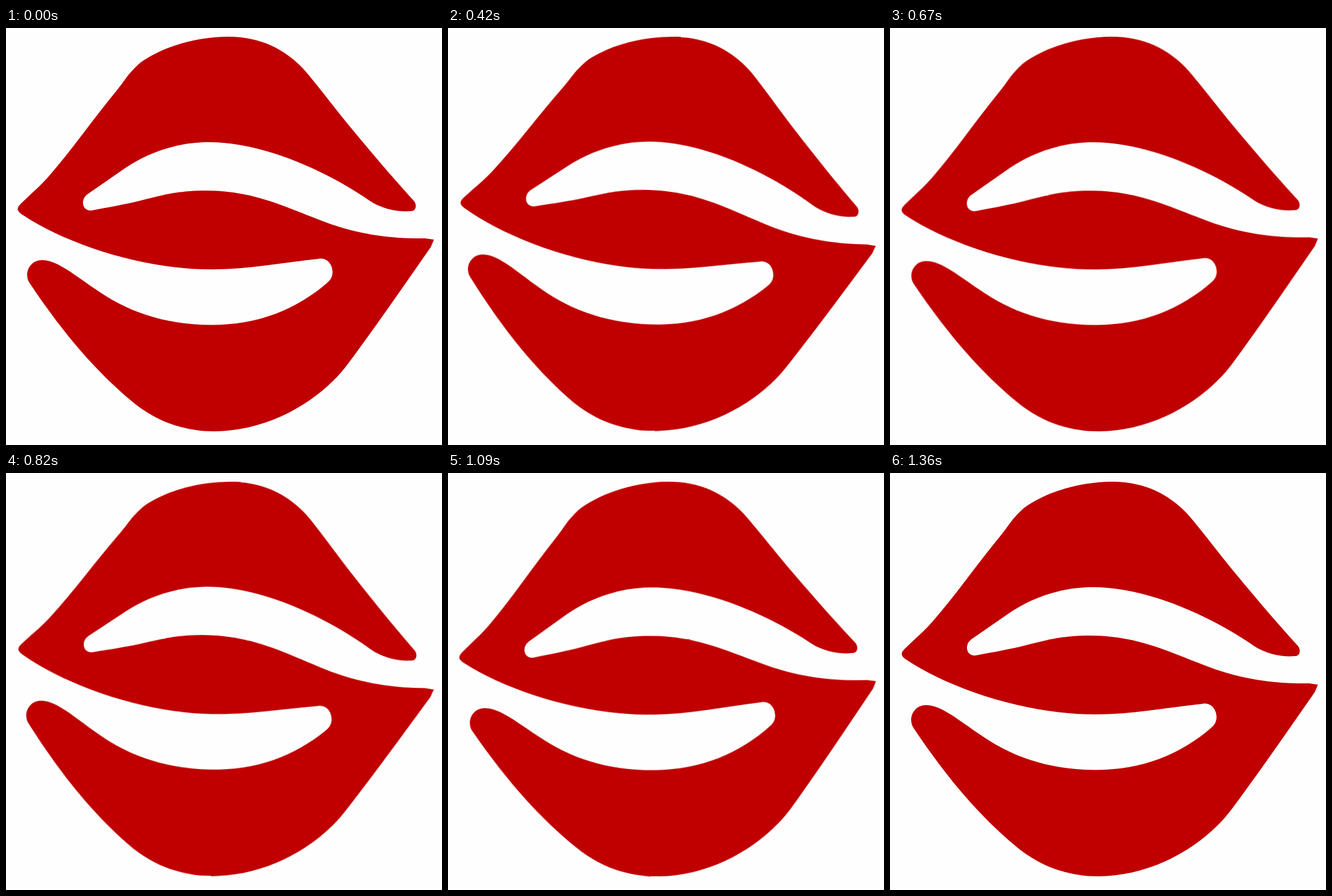
Recreate the animation shown at these times as an HTML page without scripts. Size 702 px wide and 672 px high, loop 1.64 s.

```html
<!DOCTYPE html>
<html lang="en">
<head>
<meta charset="utf-8">
<title>Teetering lips</title>
<style>
  html, body {
    margin: 0;
    width: 100%;
    height: 100%;
    overflow: hidden;
    background: #fefefe;
  }
  svg {
    display: block;
    width: 100%;
    height: 100%;
  }
  .lips {
    fill: #c00000;
    transform-origin: 354px 332px;
    animation: teeter 1640ms infinite;
  }
  /* Each swing advances in 30 ms ticks; the first peak is held for 100 ms. */
  @keyframes teeter {
    0%     { transform: rotate(0deg);     animation-timing-function: steps(1); }
    10.97% { transform: rotate(0deg);     animation-timing-function: steps(3); }
    16.46% { transform: rotate(1.9deg);   animation-timing-function: steps(1); }
    18.29% { transform: rotate(2deg);     animation-timing-function: steps(1); }
    24.39% { transform: rotate(1.75deg);  animation-timing-function: steps(6); }
    35.36% { transform: rotate(-1.85deg); animation-timing-function: steps(1); }
    37.19% { transform: rotate(-1.5deg);  animation-timing-function: steps(5); }
    46.34% { transform: rotate(1.5deg);   animation-timing-function: steps(1); }
    48.17% { transform: rotate(2deg);     animation-timing-function: steps(6); }
    59.14% { transform: rotate(-1.8deg);  animation-timing-function: steps(1); }
    60.97% { transform: rotate(-1.85deg); animation-timing-function: steps(6); }
    71.95% { transform: rotate(-.05deg);  animation-timing-function: steps(1); }
    73.78%, 100% { transform: rotate(0deg); }
  }
</style>
</head>
<body>
<svg viewBox="0 0 702 672">
  <path class="lips" d="
    M19 291 Q19 288 24 283
    C38 269 53 257 68 240 C105 198 140 147 178 101
    C190 87 194 76 215 57 C248 32 304 14 358 14
    C412 14 450 36 477 64 C498 87 528 128 558 164
    C590 203 627 246 657 279 C662 285 660 295 653 295
    C634 297 607 293 585 278 C520 233 417 184 327 184
    C268 184 223 205 193 225 L131 268
    C119 277 123 296 138 294 C170 288 193 284 217 278
    C250 270 275 262 322 262 C400 262 450 289 520 315
    C575 335 630 340 675 339 L689 341 L684 353
    C640 416 597 479 550 542 C505 602 422 650 335 650
    C290 650 243 636 202 601 C143 552 90 489 38 411
    C28 396 38 374 58 374 C90 374 127 415 182 444
    C226 467 277 478.5 331 478.5 C405 478.5 468 454 519 409
    C533 397 524 368 503 372 C445 378 390 389 331 389
    C222 389 100 350 25 300 Q18 295 19 291Z"/>
</svg>
</body>
</html>
```
